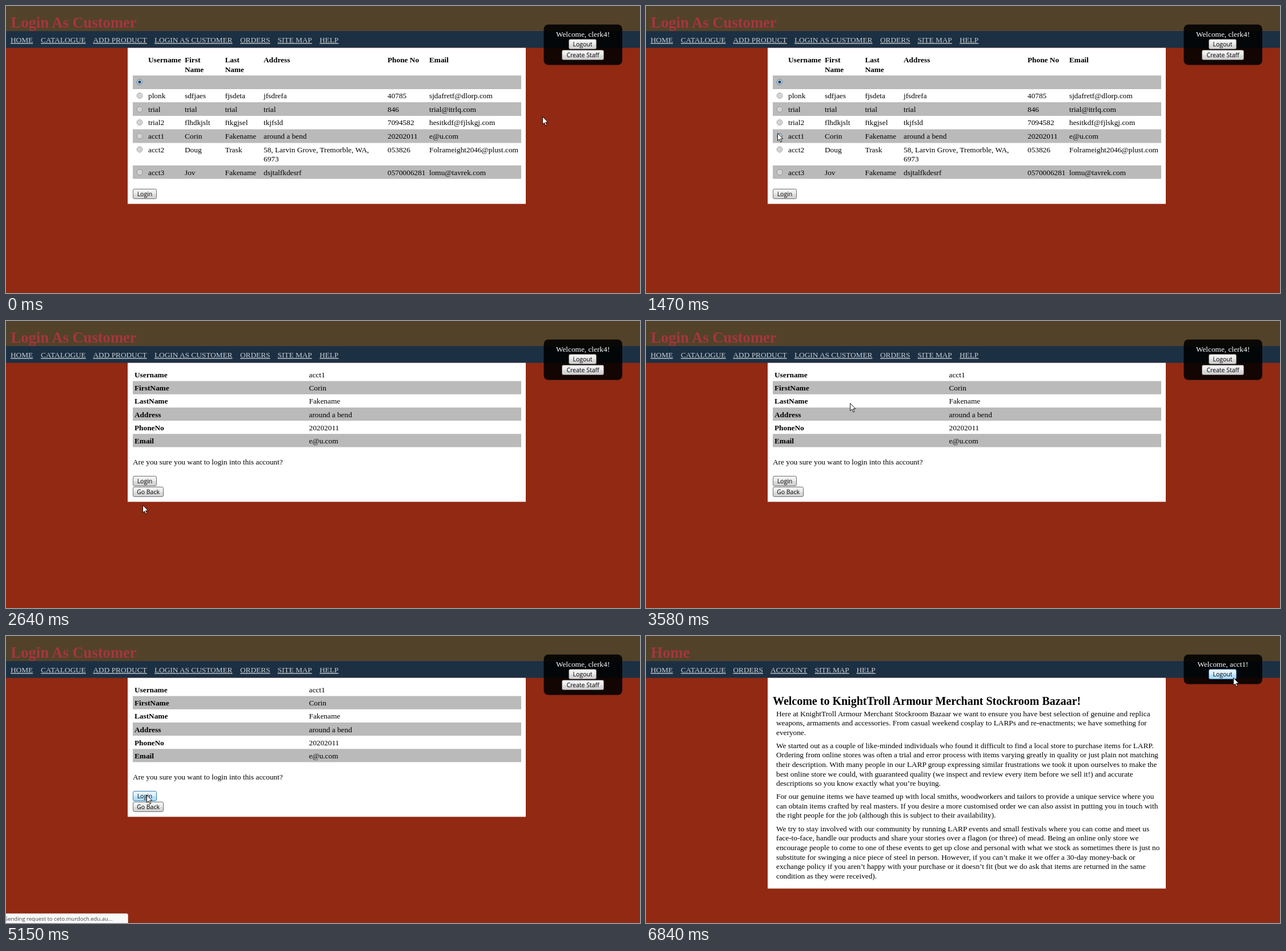
An HTML page for the animation above (7.76 s loop, 1110x504 px).

```html
<!DOCTYPE html>
<html lang="en">
<head>
<meta charset="utf-8">
<title>Login As Customer</title>
<style>
  html, body { margin: 0; width: 100%; height: 100%; overflow: hidden; background: #922912; }
  svg { display: block; }
  text { font: 13.3px "Liberation Serif", "Times New Roman", serif; }
  .bold { font-weight: bold; }
  .title { font-weight: bold; font-size: 26.6px; fill: #a6353f; }
  .heading { font-weight: bold; font-size: 20px; }
  .nav { fill: #c9cdd0; text-decoration: underline; }
  .welcome { fill: #fff; text-anchor: middle; }
  .label { font: 10.5px "Open Sans", "Noto Sans", sans-serif; text-anchor: middle; }
  .status { font: 9.5px "Open Sans", "Noto Sans", sans-serif; fill: #444; }
</style>
</head>
<body>
<svg id="stage" width="1110" height="504" viewBox="0 0 1110 504"></svg>
<script>
const LOOP = 7760;

const text = (x, y, s, cls = '') => `<text x="${x}" y="${y}" class="${cls}">${s}</text>`;
const rect = (x, y, w, h, fill, more = '') =>
  `<rect x="${x}" y="${y}" width="${w}" height="${h}" fill="${fill}" ${more}/>`;
const stripe = (y, h) => rect(222, y, 680, h, '#bababa');
const gradient = (id, ...colors) =>
  `<linearGradient id="${id}" x2="0" y2="1">${colors.map((c, i) =>
    `<stop offset="${[0, .5, .5, 1][i]}" stop-color="${c}"/>`).join('')}</linearGradient>`;
const button = (x, y, w, s) =>
  rect(x + .5, y + .5, w - 1, 17, 'url(#idle)', 'rx="2.5" stroke="#707070" class="button"') +
  text(x + w / 2, y + 13, s, 'label');
const radio = y => `<circle cx="234" cy="${y}" r="4.7" fill="#e3e3e3" stroke="#8e8f8f"/>
  <circle cx="234" cy="${y}" r="3" fill="#cfd2d4"/>`;

const frame = (title, links, bottom, user, staff) =>
  text(8.5, 38, title, 'title') +
  links.map(([x, s]) => text(x, 64, s, 'nav')).join('') +
  rect(213, 73.5, 697, bottom - 73.5, '#fff') +
  rect(941.5, 32.5, 137.5, staff ? 71 : 52, '#000', 'rx="8" opacity=".88"') +
  text(1010, 54, `Welcome, ${user}!`, 'welcome') +
  button(985, 58, 49, 'Logout') +
  (staff ? button(973, 77, 74, 'Create Staff') : '');

const staffLinks = [[8, 'HOME'], [61, 'CATALOGUE'], [152.5, 'ADD PRODUCT'], [260, 'LOGIN AS CUSTOMER'],
  [410, 'ORDERS'], [475.5, 'SITE MAP'], [549, 'HELP']];
const userLinks = [[8, 'HOME'], [61, 'CATALOGUE'], [152.5, 'ORDERS'], [218, 'ACCOUNT'],
  [295.5, 'SITE MAP'], [368.5, 'HELP']];

const columns = [249, 313, 383.5, 451, 668, 741];
const customers = [
  [138, ''],
  [162, 'plonk', 'sdfjaes', 'fjsdeta', 'jfsdrefa', '40785', 'sjdafretf@dlorp.com'],
  [186, 'trial', 'trial', 'trial', 'trial', '846', 'trial@itrlq.com'],
  [209, 'trial2', 'flhdkjslt', 'ftkgjsel', 'tkjfsld', '7094582', 'hesitkdf@fjlskgj.com'],
  [233, 'acct1', 'Corin', 'Fakename', 'around a bend', '20202011', 'e@u.com'],
  [256.5, 'acct2', 'Doug', 'Trask', '58, Larvin Grove, Tremorble, WA,', '053826', 'Folrameight2046@plust.com'],
  [296.5, 'acct3', 'Jov', 'Fakename', 'dsjtalfkdesrf', '0570006281', 'lomu@tavrek.com']
];
const cells = (y, values, cls) => values.map((s, i) => text(columns[i], y, s, cls)).join('');

const listPage = frame('Login As Customer', staffLinks, 347.5, 'clerk4', true) +
  stripe(122, 24) + stripe(169, 24) + stripe(216.5, 24) + stripe(280, 23.5) +
  cells(99, ['Username', 'First', 'Last', 'Address', 'Phone No', 'Email'], 'bold') +
  text(313, 115.5, 'Name', 'bold') + text(383.5, 115.5, 'Name', 'bold') +
  customers.map(([y, ...values]) => radio(y - 4.5) + cells(y, values)).join('') +
  text(451, 273, '6973') +
  `<circle id="pressed" cx="234" cy="228.5" r="4.2" fill="#b4d9ee" stroke="#4a7fa5"/>
   <g id="checked"><circle r="4.7" fill="#dcebf5" stroke="#5b7488"/><circle r="2.7" fill="#174a78"/></g>` +
  button(222, 321, 42, 'Login');

const details = ['Username', 'FirstName', 'LastName', 'Address', 'PhoneNo', 'Email'];
const confirmPage = frame('Login As Customer', staffLinks, 317.5, 'clerk4', true) +
  details.map((name, i) => {
    const y = 99 + i * 23.2;
    return (i % 2 ? stripe(y - 16.7, 23.2) : '') + text(225, y, name, 'bold') + text(530.5, y, customers[4][i + 1]);
  }).join('') +
  text(222, 251.5, 'Are you sure you want to login into this account?') +
  button(222, 272, 42, 'Login') + button(222, 291, 54, 'Go Back');

const shop = 'KnightTroll Armour Merchant Stockroom Bazaar';
const paragraphs = [
  [140.5, `Here at ${shop} we want to ensure you have best selection of genuine and replica
weapons, armaments and accessories. From casual weekend cosplay to LARPs and re-enactments; we have something for
everyone.`],
  [196.7, `We started out as a couple of like-minded individuals who found it difficult to find a local store to purchase items for LARP.
Ordering from online stores was often a trial and error process with items varying greatly in quality or just plain not matching
their description. With many people in our LARP group expressing similar frustrations we took it upon ourselves to make the
best online store we could, with guaranteed quality (we inspect and review every item before we sell it!) and accurate
descriptions so you know exactly what you’re buying.`],
  [286.2, `For our genuine items we have teamed up with local smiths, woodworkers and tailors to provide a unique service where you
can obtain items crafted by real masters. If you desire a more customised order we can also assist in putting you in touch with
the right people for the job (although this is subject to their availability).`],
  [342.7, `We try to stay involved with our community by running LARP events and small festivals where you can come and meet us
face-to-face, handle our products and share your stories over a flagon (or three) of mead. Being an online only store we
encourage people to come to one of these events to get up close and personal with what we stock as sometimes there is just no
substitute for swinging a nice piece of steel in person. However, if you can’t make it we offer a 30-day money-back or
exchange policy if you aren’t happy with your purchase or it doesn’t fit (but we do ask that items are returned in the same
condition as they were received).`]
];
const homePage = frame('Home', userLinks, 443.5, 'acct1', false) +
  text(222, 121, `Welcome to ${shop}!`, 'heading') +
  paragraphs.map(([top, body]) =>
    body.split('\n').map((line, i) => text(228, top + i * 16.6, line)).join('')).join('');

const stage = document.getElementById('stage');
stage.innerHTML = `<defs>
  ${gradient('idle', '#f4f4f4', '#ebebeb', '#dedede', '#cfcfcf')}
  ${gradient('hover', '#eaf6fd', '#d9f0fc', '#bee6fd', '#a7d9f5')}
  ${gradient('down', '#e5f4fc', '#c4e5f6', '#98d1ef', '#68b3db')}</defs>` +
  rect(0, 0, 1110, 504, '#922912') + rect(0, 0, 1110, 44, '#53422a') + rect(0, 44, 1110, 29.5, '#1c3044') +
  [listPage, confirmPage, homePage].map(p => `<g class="page">${p}</g>`).join('') +
  `<g id="status"><path d="M-1 487.5H211q2.5 0 2.5 2.5V505H-1z" fill="#f9f9f9" stroke="#c4c4c4"/>
    ${text(-2, 500, 'Sending request to ceto.murdoch.edu.au...', 'status')}</g>
  <path id="arrow" d="M.5 .5V13.7L3.5 10.9 5.8 16 7.8 15.1 5.6 10.1H9.8Z" fill="#fff" stroke="#000" stroke-width=".9"/>
  <path id="beam" d="M-3 -6.5H-1L0 -5.5 1 -6.5H3M0 -5.5V5.5M-3 6.5H-1L0 5.5 1 6.5H3" fill="none" stroke="#000"/>`;

const [arrow, beam, status, checked, pressed] =
  ['arrow', 'beam', 'status', 'checked', 'pressed'].map(id => document.getElementById(id));
const pages = [...stage.querySelectorAll('.page')];
const buttons = pages.map(p => [...p.querySelectorAll('.button')]);

// Pointer moves: first step, last step, step count, x, y, vertical bend
const moves = [
  [350, 1090, 10, 214, 224, 16],
  [1160, 1330, 3, 225, 223, 0],
  [1470, 1470, 1, 230, 223, 0],
  [1760, 2190, 6, 239, 323, 0],
  [3030, 3410, 6, 374, 105, 0],
  [3490, 3580, 2, 357, 144, 0],
  [3640, 3720, 2, 303, 245, 0],
  [3810, 4280, 7, 247, 278, 0],
  [4420, 4520, 2, 246, 279, 0],
  [5200, 5200, 1, 247.5, 281.5, 0],
  [5660, 5820, 3, 395, 275, 0],
  [6370, 6840, 7, 1028, 73, 0]
];

function pointer(t) {
  let x = 939, y = 194;
  for (const [start, end, steps, toX, toY, bend] of moves) {
    if (t < start) break;
    const step = steps > 1 ? Math.floor((t - start) / (end - start) * (steps - 1) + 1e-6) : 0;
    const p = Math.min(1, (step + 1) / steps), e = p * p * (3 - 2 * p);
    x += (toX - x) * e;
    y += (toY - y) * e + 4 * e * (1 - e) * bend;
  }
  return [x, y];
}

const between = (t, a, b) => t >= a && t < b;
const show = (el, on) => el.setAttribute('visibility', on ? 'visible' : 'hidden');

function draw(now) {
  const t = now % LOOP;
  const page = t < 2640 ? 0 : t < 5200 ? 1 : 2;
  const [x, y] = pointer(t);
  const down = between(t, 2330, 2480) || between(t, 4970, 5060);

  pages.forEach((p, i) => p.setAttribute('display', i === page ? 'inline' : 'none'));
  for (const b of buttons[page]) {
    const { x: left, y: top, width, height } = b.getBBox();
    const over = between(x, left, left + width) && between(y, top, top + height);
    b.setAttribute('fill', `url(#${over ? down ? 'down' : 'hover' : 'idle'})`);
    b.setAttribute('stroke', over ? '#3c7fb1' : '#707070');
  }
  checked.setAttribute('transform', `translate(234 ${t < 1690 ? 133.5 : 228.5})`);
  pressed.setAttribute('display', between(t, 1470, 1690) ? 'inline' : 'none');
  show(status, between(t, 2480, 2640) || between(t, 5150, 5200));

  const overText = page === 2 && between(x, 226, 902) && y > 104;
  show(arrow, !overText);
  show(beam, overText);
  for (const c of [arrow, beam]) c.setAttribute('transform', `translate(${x} ${y})`);
}

const begin = performance.now();
(function tick() {
  draw(performance.now() - begin);
  requestAnimationFrame(tick);
})();
</script>
</body>
</html>
```
